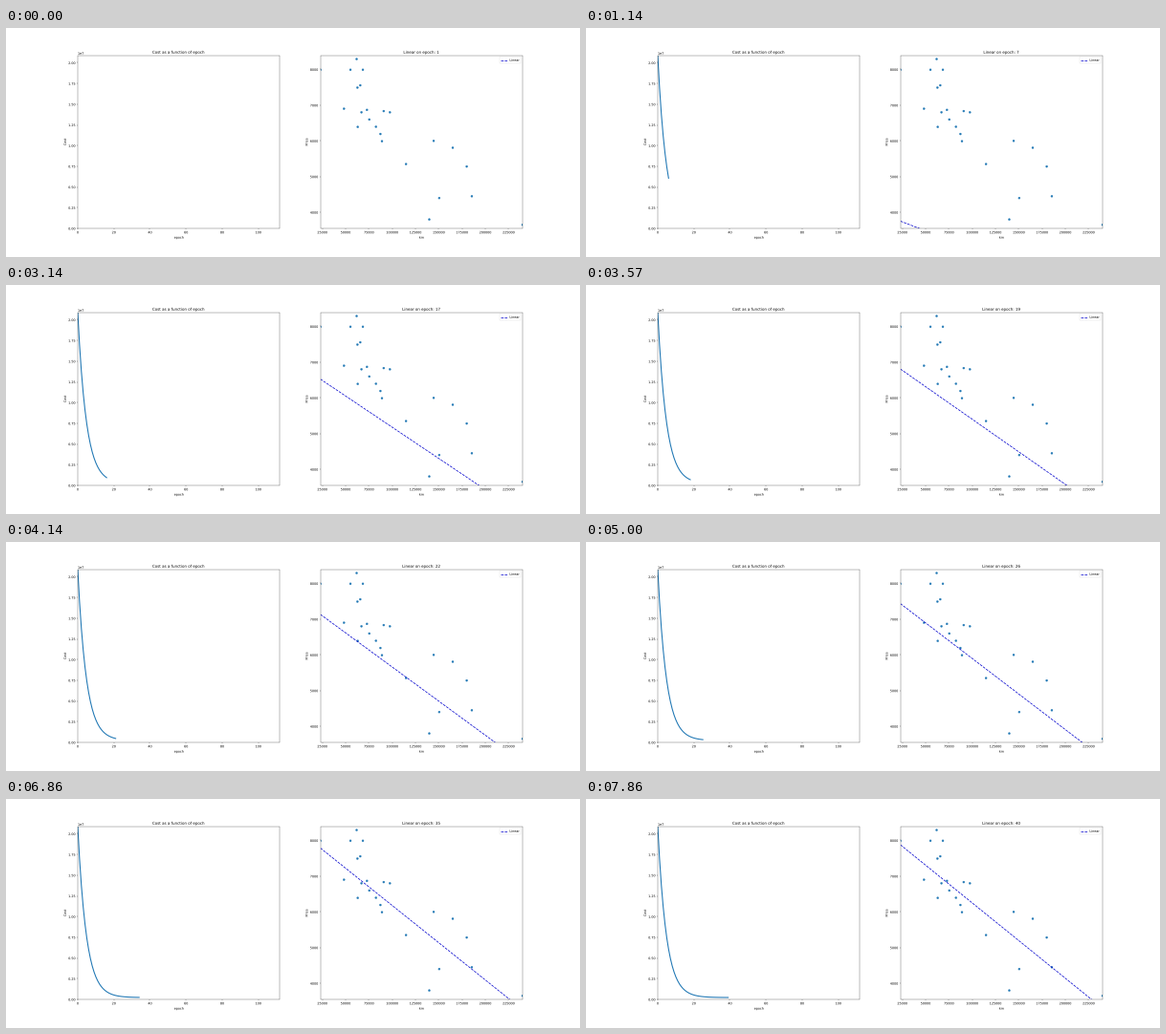
A matplotlib script that plays this animation: 600 px wide and 240 px high, repeating every 8000 ms.

```python
import numpy as np
import matplotlib.pyplot as plt
from matplotlib.animation import FuncAnimation
from matplotlib.patheffects import Normal
from matplotlib.text import Text

plt.rcParams["font.family"] = "DejaVu Sans"

LOOP, STEP = 8000, 40                 # ms
EPOCHS, RATE = 112, 0.1
INTERCEPT, SLOPE = 8500, -0.02145     # where the fit converges
COST_START, COST_END = 20.88e6, 0.223e6
KM = np.array([22899, 240000])


def trail(n, start, end, bow=1):
    """n dots (1000 km, price) that bunch up towards the end of the trail."""
    u = np.linspace(0, 1, n)
    ease = np.column_stack([np.sin(u * np.pi / 2), u ** bow])
    return start + (np.array(end) - start) * ease


def cars():
    return np.vstack([
        trail(3, (22.9, 7990), (68.5, 7990)),
        trail(3, (61.8, 8290), (63, 6390), 1.25),
        trail(4, (48.2, 6900), (97.5, 6800)),
        trail(5, (67, 6800), (89, 5990)),
        trail(4, (144.5, 6000), (185.5, 4450), 1.9),
        [(65.7, 7555), (114.8, 5350), (150.5, 4400), (139.8, 3800), (240, 3650)],
    ])


def cost(k):
    return COST_END + (COST_START - COST_END) * (1 - RATE) ** (2 * k)


def prices(k):
    return (1 - (1 - RATE) ** k) * (INTERCEPT + SLOPE * KM)


def label(ax, title, x, y):
    ax.set_xlabel(x)
    ax.set_ylabel(y)
    return ax.set_title(title)


fig, (left, right) = plt.subplots(1, 2, figsize=(25, 10), dpi=24)
fig.subplots_adjust(left=0.125, right=0.9, bottom=0.125, top=0.88, wspace=0.2)

label(left, "Cost as a function of epoch", "epoch", "Cost")
left.set(xlim=(0, EPOCHS), ylim=(0, COST_START))
curve, = left.plot([], [], color="tab:blue", lw=3.2)

title = label(right, "Linear on epoch: 1", "km", "Price")
right.set(xlim=KM, ylim=(3550, 8390))
x, y = cars().T
right.scatter(x * 1000, y, s=np.full(len(x), 36), color="tab:blue")
fit, = right.plot(KM, prices(0), "--", color="mediumblue", lw=2.2, label="Linear")
right.legend(loc="upper right")

# outline text stays legible at this small size
fig.canvas.draw()
for text in fig.findobj(Text):
    text.set_path_effects([Normal()])


def epoch_at(frame):
    # five epochs a second, shown on a clock of seven ticks a second
    tick = (frame * STEP + STEP - 2) * 7 // 1000
    return int((tick + 0.5) / 1.4)


def update(frame):
    k = epoch_at(frame)
    steps = np.arange(k + 1)
    curve.set_data(steps, cost(steps))
    fit.set_ydata(prices(k))
    title.set_text(f"Linear on epoch: {k + 1}")
    return curve, fit, title


anim = FuncAnimation(fig, update, frames=LOOP // STEP, interval=STEP,
                     repeat=True, repeat_delay=0, blit=False)
plt.show()
```
